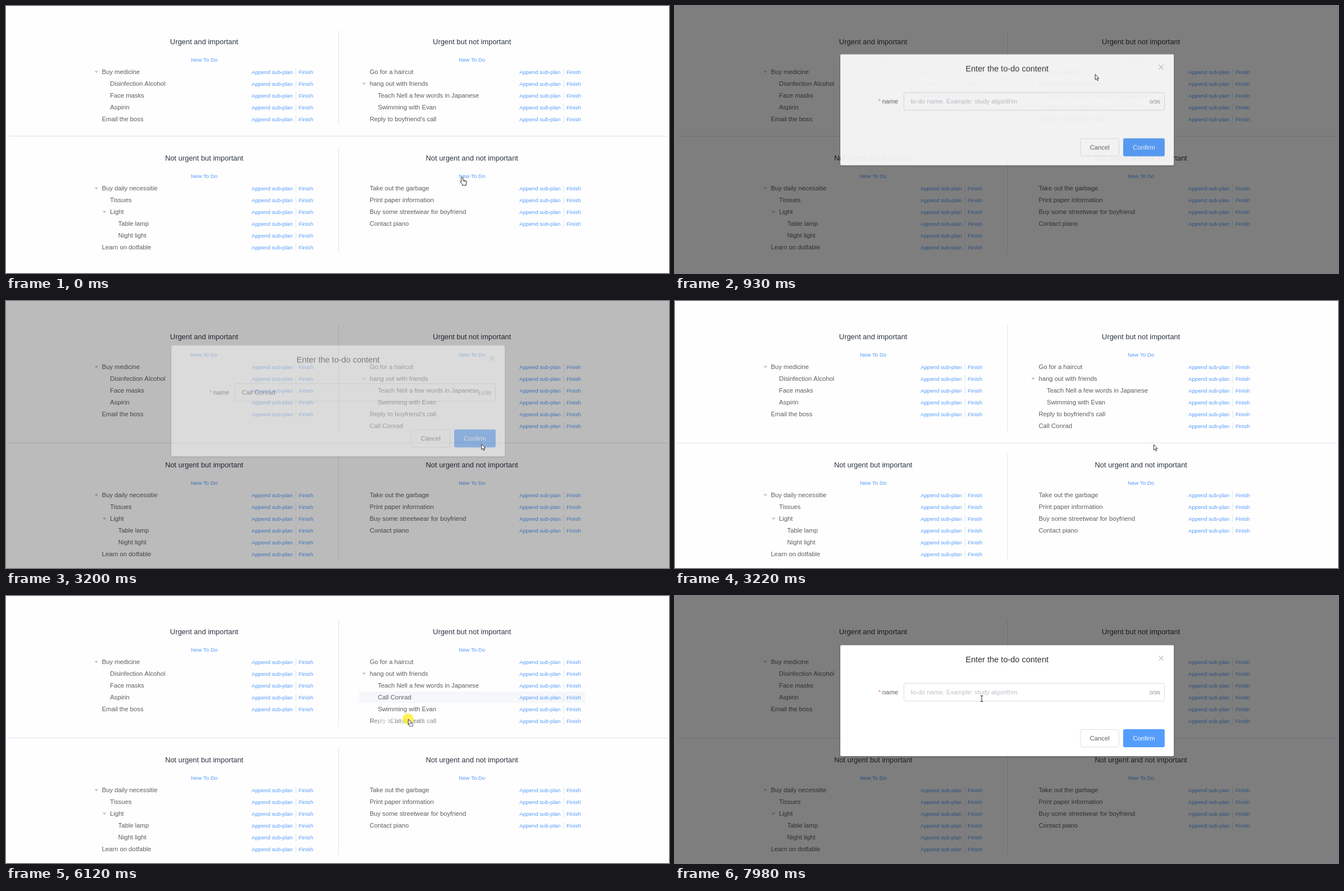
Recreate the animation shown at these times as an HTML page with a canvas. Size 1179 by 475 pixels, loop 8000 ms.

```html
<!DOCTYPE html>
<html lang="en">
<head>
<meta charset="utf-8">
<title>To-do quadrants</title>
<style>
html, body { margin: 0; width: 100%; height: 100%; overflow: hidden; background: #fefefe; }
canvas { display: block; }
</style>
</head>
<body>
<canvas id="stage" width="1179" height="475"></canvas>
<script>
const stage = document.getElementById('stage');
const layer = stage.cloneNode();
const page = stage.getContext('2d'), overlay = layer.getContext('2d');
let ctx = page;

const LOOP = 8000, ROW = 20.87;
const BODY = 11.27, SMALL = 9.66, TITLE = 12.9, HEAD = 14.5;
const BLUE = '#549bfb', LINE = '#dfe2e8', TEXT = '#5c5e62';
const NEW_ITEM = 'Call Conrad';

// Rows: [indent level, label, has children]
const medicine = [[0, 'Buy medicine', 1], [1, 'Disinfection Alcohol'], [1, 'Face masks'],
  [1, 'Aspirin'], [0, 'Email the boss']];
const daily = [[0, 'Buy daily necessitie', 1], [1, 'Tissues'], [1, 'Light', 1],
  [2, 'Table lamp'], [2, 'Night light'], [0, 'Learn on dotfable']];
const friends = [[0, 'Go for a haircut'], [0, 'hang out with friends', 1],
  [1, 'Teach Nell a few words in Japanese'], [1, 'Swimming with Evan'], [0, "Reply to boyfriend's call"]];
const chores = [[0, 'Take out the garbage'], [0, 'Print paper information'],
  [0, 'Buy some streetwear for boyfriend'], [0, 'Contact piano']];

// Pointer path: [time, x, y, shape, pressed]
const path = [
  [0, 811, 304, 'hand'], [310, 818, 190, 'arrow'], [620, 825, 97, 'hand', 1],
  [930, 747, 121, 'arrow'], [1240, 620, 160, 'beam'], [1550, 600, 163, 'beam', 1],
  [1860, 600, 163, 'beam'], [2270, 600, 163, 'beam'], [2580, 834, 253, 'hand', 1],
  [2890, 845, 254, 'arrow'], [3220, 851, 255, 'arrow'], [3530, 690, 219, 'arrow'],
  [3840, 685, 216, 'drag', 1], [4150, 705, 174, 'drag', 1], [4480, 700, 177, 'arrow'],
  [4790, 693, 177, 'arrow', 1], [5100, 710, 201, 'drag', 1], [5720, 728, 332, 'drag', 1],
  [6430, 705, 131, 'drag', 1], [6740, 710, 137, 'arrow'], [7360, 963, 134, 'hand', 1],
  [7670, 760, 150, 'arrow'], [7980, 545, 182, 'beam']];

const clamp = v => Math.min(1, Math.max(0, v));

function hold(t) {
  const start = [0, 1960, 2910, 4170, 6120].filter(s => s <= t).pop();
  return start + Math.floor((t - start) / 310) * 310;
}

function pointerAt(t) {
  const i = path.findLastIndex(p => p[0] <= t);
  const a = path[i], b = path[i + 1] || a;
  const k = b === a ? 0 : (t - a[0]) / (b[0] - a[0]);
  return { x: a[1] + (b[1] - a[1]) * k, y: a[2] + (b[2] - a[2]) * k, shape: a[3], pressed: a[4] };
}

function text(str, x, y, size, color, align = 'left') {
  ctx.font = size + 'px "Liberation Sans", Arial, sans-serif';
  ctx.textAlign = align;
  ctx.fillStyle = color;
  ctx.fillText(str, x, y);
}

function rect(x, y, w, h, color) {
  ctx.fillStyle = color;
  ctx.fillRect(x, y, w, h);
}

function box(x, y, w, h, r, fill, stroke, width = 1) {
  ctx.beginPath();
  ctx.roundRect(x, y, w, h, r);
  if (fill) { ctx.fillStyle = fill; ctx.fill(); }
  if (stroke) { ctx.strokeStyle = stroke; ctx.lineWidth = width; ctx.stroke(); }
}

function shape(d, fill, stroke, width = 1) {
  const p = new Path2D(d);
  if (fill) { ctx.fillStyle = fill; ctx.fill(p); }
  if (stroke) { ctx.strokeStyle = stroke; ctx.lineWidth = width; ctx.stroke(p); }
}

function at(x, y, draw) {
  ctx.save();
  ctx.translate(x, y);
  draw();
  ctx.restore();
}

function panel(dx, top, title, rows, active) {
  at(dx, Math.round(top), () => {
    text(title, 352.4, 68, TITLE, '#2c3541', 'center');
    text('New To Do', 352.4, 99, SMALL, BLUE, 'center');
    rows.forEach(([level, label, parent], i) => {
      const y = Math.round(117.2 + i * ROW), x = 170.5 + level * 14.5;
      if (label === active) rect(151.5, y - 10, 402, 20, '#f5f7fb');
      if (parent) shape(`M${x - 13.2} ${y - 1.4}h6.6l-3.3 4z`, '#c0c4cc');
      text(label, x, y + 4, BODY, TEXT);
      text('Append sub-plan', 436.8, y + 4, SMALL, BLUE);
      rect(515, y - 6, 1, 13, LINE);
      text('Finish', 520.5, y + 4, SMALL, BLUE);
    });
  });
}

function board(t) {
  const rows = friends.slice();
  if (t >= 6740) rows.splice(1, 0, [0, NEW_ITEM]);
  else if (t >= 4480) rows.splice(3, 0, [1, NEW_ITEM]);
  else if (t >= 2890) rows.push([0, NEW_ITEM]);
  const active = t >= 3530 && t < 7670 ? NEW_ITEM : '';
  const grow = (rows.length - 5) * ROW, low = 207.4 + grow;

  rect(0, 0, 1179, 475, '#fefefe');
  panel(0, 0, 'Urgent and important', medicine);
  panel(476.2, 0, 'Urgent but not important', rows, active);
  panel(0, low, 'Not urgent but important', daily);
  panel(476.2, low, 'Not urgent and not important', chores);
  rect(591, 43, 1, Math.round(168 + grow), LINE);
  rect(591, Math.round(251 + grow), 1, 188, LINE);
  rect(4, Math.round(231 + grow), 1173, 1, LINE);
}

function dialog(t) {
  const typed = t < 7000 ? NEW_ITEM.slice(0, Math.floor(clamp((t - 1640) / 610) * 11)) : '';
  const focused = t >= 1550 && t < 2580;
  ctx.shadowColor = 'rgba(0,0,0,.3)';
  ctx.shadowBlur = 3;
  ctx.shadowOffsetY = 1;
  box(294, 87.5, 593, 197.5, 2, '#fff');
  ctx.shadowColor = 'transparent';
  text('Enter the to-do content', 590.5, 118, HEAD, '#303133', 'center');
  shape('M860.5 106.5l8 8m0-8l-8 8', null, '#909399');
  text('*', 361.3, 175, BODY, '#e08a5c');
  text('name', 368.6, 175, BODY, TEXT);
  box(407, 155.5, 463.5, 31.5, 3, null, focused ? '#6aaaf8' : '#d8dbe1');
  text(typed || 'to-do name. Example: study algorithm', 419.2, 175, BODY, typed ? TEXT : '#bcc0c8');
  text(typed.length + '/35', 862.8, 175, SMALL, '#85888e', 'right');
  box(721, 237.5, 68.5, 31, 3, null, '#dcdfe6');
  text('Cancel', 755.2, 257, BODY, TEXT, 'center');
  box(797, 237, 73.8, 32, 3, '#549dfd');
  text('Confirm', 834, 257, BODY, '#fff', 'center');
}

// The dialog is drawn on its own layer so that it fades as one piece.
function fadeDialog(t, alpha) {
  rect(0, 0, 1179, 475, `rgba(0,0,0,${clamp(alpha * 1.15) / 2})`);
  ctx = overlay;
  ctx.clearRect(0, 0, 1179, 475);
  dialog(t);
  ctx = page;
  ctx.globalAlpha = alpha;
  ctx.drawImage(layer, 0, (alpha - 1) * 16);
  ctx.globalAlpha = 1;
}

function capsBadge() {
  box(515.5, 384, 99.5, 100, 4, 'rgba(84,84,84,.5)', 'rgba(70,70,70,.5)');
  box(537, 406, 58, 53.5, 7, 'rgba(70,70,70,.4)', '#fff', 4);
  ctx.lineCap = 'round';
  text('abc', 565.8, 439, 18.5, '#fff', 'center');
  shape('M544 417.5l4.7-4.5 4.7 4.5', null, '#fff', 2);
  shape('M575 452.3q11 .5 11.5-9', null, '#fff', 1.8);
  ctx.lineCap = 'butt';
}

function dragGhost(x, y) {
  const veil = ctx.createLinearGradient(x - 68, 0, x + 80, 0);
  for (const [k, o] of [[0, 0], [.15, .6], [.6, .5], [1, 0]]) veil.addColorStop(k, `rgba(254,254,254,${o})`);
  rect(x - 68, y - 8, 148, 20, veil);
  text(NEW_ITEM, x - 32, y + 7, BODY, 'rgba(92,94,98,.45)');
}

function cursor(p) {
  if (p.shape === 'drag') dragGhost(p.x, p.y);
  if (p.pressed) {
    ctx.beginPath();
    ctx.arc(p.x, p.y, 10, 0, 7);
    ctx.fillStyle = 'rgba(255,238,50,.8)';
    ctx.fill();
  }
  at(p.x, p.y, () => {
    if (p.shape === 'beam') {
      shape('M-2-4.5h5M-2 5.5h5M.5-4.5v10', null, '#333');
    } else if (p.shape === 'hand') {
      shape('M-1.5 1.3q1.5-2 3 0V6l6 1.3q.9.3.9 1.3L7.2 12.5V15H.5v-1.7L-3 9.2q-.7-1.6 1.5-.7z', '#fff', '#222');
      shape('M3.5 6.5v2.2M5.6 7v2', null, '#222', .8);
    } else {
      shape('M.3.3V10.2L2.5 8.2 4.1 11.8 5.6 11.1 4.1 7.7H7z', '#fff', '#333');
      if (p.shape === 'drag') box(2, 7.5, 6.5, 5.5, 1, '#fff', '#555');
    }
  });
}

function draw(t) {
  const fade = t < 2750 ? clamp((t - 660) / 300)
    : t < 7000 ? clamp(1 - (t - 2750) / 300)
    : clamp((t - 7410) / 300);
  board(t);
  if (fade) fadeDialog(t, fade);
  if (t >= 1860 && t < 2890) capsBadge();
  cursor(pointerAt(t));
}

const begin = performance.now();
function tick() {
  draw(hold((performance.now() - begin) % LOOP));
  requestAnimationFrame(tick);
}
tick();
</script>
</body>
</html>
```
